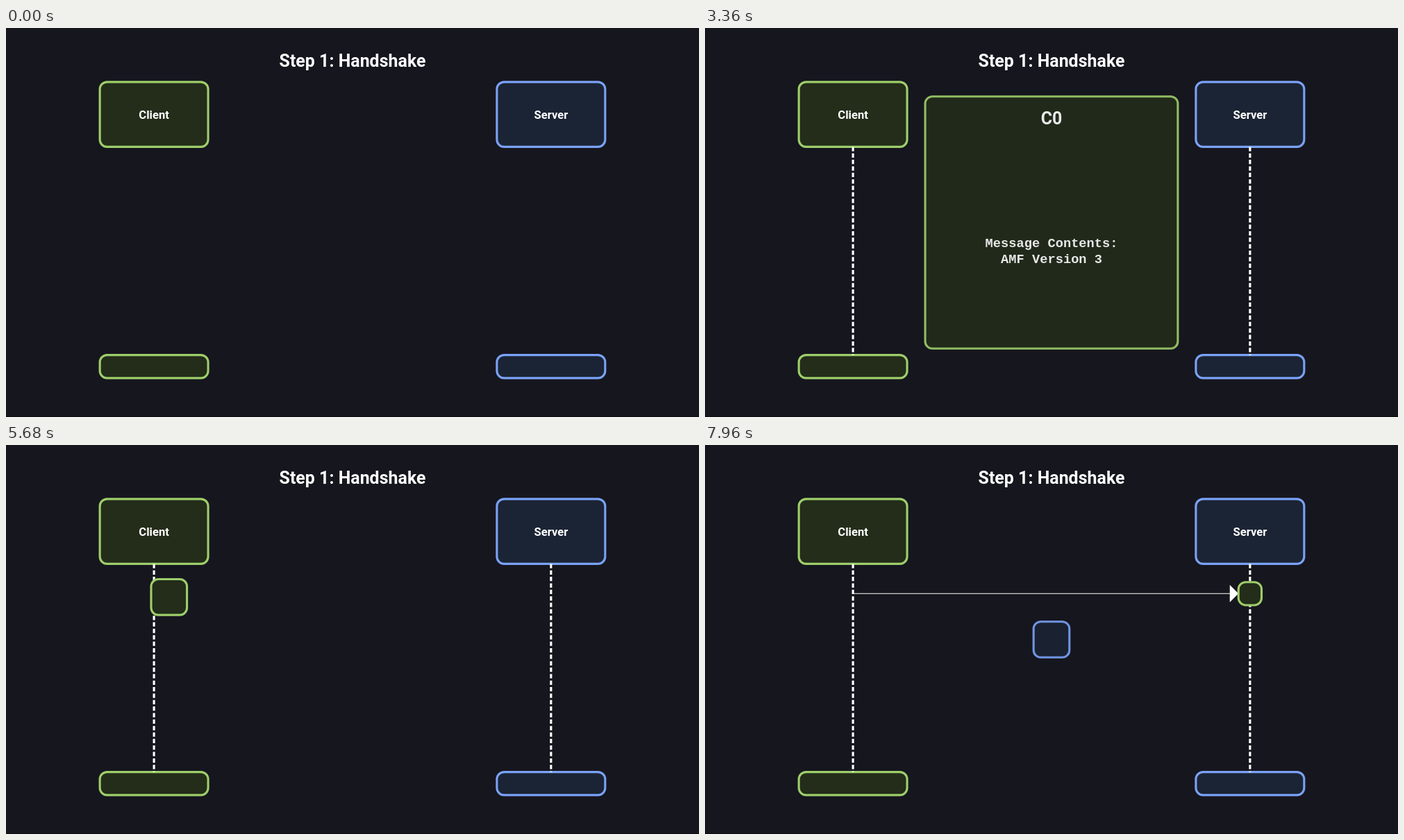
Animation, 998 px wide and 561 px high, one loop 8000 ms. Source, as an HTML page with a canvas:

```html
<!DOCTYPE html>
<html lang="en">
<head>
<meta charset="utf-8">
<title>Step 1: Handshake</title>
<style>
  html, body { margin: 0; width: 100%; height: 100%; overflow: hidden; background: #16161e; }
  canvas { display: block; width: 998px; height: 561px; }
</style>
</head>
<body>
<canvas id="stage" width="998" height="561"></canvas>
<script>
const W = 998, H = 561, LOOP = 8000, STEP = 40;
const BG = '#16161e';
const GREEN = { stroke: '#9ece6a', fill: '#232d1a' };
const BLUE = { stroke: '#7aa2f7', fill: '#1b2434' };
const SANS = 'Roboto, sans-serif';
const MONO = '"Courier New", Courier, "Liberation Mono", monospace';

// Scene units are 1920 x 1080.
const CLIENT_X = 410, SERVER_X = 1510, MID_X = 960, MID_Y = 540, ROW_Y = 412.6;
const BOX = 64, SMALL = 50, LARGE = 700;
const MESSAGE = 'Message Contents:\nAMF Version 3';
const PAYLOAD = 'Payload:\n0x03';

function makeLayer(canvas) {
  canvas.width = W;
  canvas.height = H;
  const c = canvas.getContext('2d');
  c.setTransform(W / 1920, 0, 0, H / 1080, 0, 0);
  return c;
}
const ctx = makeLayer(document.getElementById('stage'));
const layer = makeLayer(document.createElement('canvas'));

const lerp = (a, b, v) => a + (b - a) * v;
const ease = u => u < 0.5 ? 4 * u ** 3 : 1 - (2 - 2 * u) ** 3 / 2;
const tween = (t, start, length = 600) =>
  ease(Math.min(1, Math.max(0, (t - start) / length)));

function card(c, x, y, w, h, color) {
  c.beginPath();
  c.roundRect(x - w / 2, y - h / 2, w, h, 20);
  c.fillStyle = color.fill;
  c.fill();
  c.lineWidth = 6;
  c.strokeStyle = color.stroke;
  c.stroke();
}

function label(c, text, x, baseline, size, family = SANS) {
  c.font = `bold ${size}px ${family}`;
  c.textAlign = 'center';
  c.textBaseline = 'alphabetic';
  c.fillStyle = '#fff';
  c.fillText(text, x, baseline);
}

function lifeline(x, v) {
  if (v <= 0) return;
  ctx.beginPath();
  ctx.moveTo(x, 330);
  ctx.lineTo(x, lerp(330, 908, v));
  ctx.setLineDash([12, 6]);
  ctx.lineWidth = 6;
  ctx.strokeStyle = '#fff';
  ctx.stroke();
  ctx.setLineDash([]);
}

function arrow(x1, x2, y) {
  ctx.strokeStyle = ctx.fillStyle = '#fff';
  ctx.lineWidth = 2;
  ctx.beginPath();
  ctx.moveTo(x1, y);
  ctx.lineTo(Math.max(x1, x2 - 20), y);
  ctx.stroke();
  const head = Math.min(24, x2 - x1);
  ctx.beginPath();
  ctx.moveTo(x2, y);
  ctx.lineTo(x2 - head, y - head);
  ctx.lineTo(x2 - head, y + head);
  ctx.fill();
}

// Rewrites a longer string into a shorter one from right to left.
function morph(from, to, v) {
  if (v <= 0) return from;
  if (v >= 1) return to;
  const kept = Math.round(from.length * (1 - v));
  const length = Math.floor(lerp(from.length + 1, to.length, v));
  return [...from].map((ch, i) => {
    if (i < kept) return ch;
    return to[i] ?? (i < length ? ch : '');
  }).join('');
}

function bodyText(c, x, y, v) {
  c.font = `bold 36px ${MONO}`;
  const lines = morph(MESSAGE, PAYLOAD, v).split('\n');
  const widest = Math.max(...lines.map(s => c.measureText(s).width));
  const room = c.measureText(MESSAGE.split('\n')[0]).width - 68 * v;
  const shift = Math.max(0, (widest - room) / 2);
  lines.forEach((s, i) => label(c, s, x + shift, y + 68.5 + i * 43.2, 36, MONO));
}

function packet(x, y, size, color, alpha, textAlpha = 0, v = 0) {
  if (alpha <= 0) return;
  layer.clearRect(0, 0, 1920, 1080);
  card(layer, x, y, size, size, color);
  if (textAlpha > 0) {
    layer.globalAlpha = textAlpha;
    label(layer, 'C0', x, y - size / 2 + 78, 48);
    bodyText(layer, x, y, v);
    layer.globalAlpha = 1;
  }
  ctx.globalAlpha = alpha;
  ctx.drawImage(layer.canvas, 0, 0, 1920, 1080);
  ctx.globalAlpha = 1;
}

const boxSize = v => Math.max(BOX, lerp(SMALL, LARGE, v));

function draw(t) {
  ctx.fillStyle = BG;
  ctx.fillRect(0, 0, 1920, 1080);

  label(ctx, 'Step 1: Handshake', MID_X, 107.8, 48);
  for (const [x, name, color] of [[CLIENT_X, 'Client', GREEN], [SERVER_X, 'Server', BLUE]]) {
    card(ctx, x, 240, 300, 180, color);
    label(ctx, name, x, 251.5, 32);
    card(ctx, x, 940, 300, 64, color);
    lifeline(x, tween(t, 0));
  }

  const dock = tween(t, 4800, 1200);
  const send = tween(t, 6000, 1200);
  const leave = tween(t, 4800);
  if (send > 0) arrow(CLIENT_X, lerp(CLIENT_X, SERVER_X - BOX / 2, send), ROW_Y);

  packet(
    lerp(lerp(MID_X, CLIENT_X, dock), SERVER_X, send),
    lerp(MID_Y, ROW_Y, dock),
    boxSize(tween(t, 1200) - dock),
    GREEN,
    0.9 * tween(t, 600) + 0.1 * leave,
    tween(t, 1800) * (1 - leave),
    tween(t, 3300)
  );
  packet(MID_X, MID_Y, boxSize(tween(t, 7800)), BLUE, 0.9 * tween(t, 7200));

  // Dark bottom edge
  ctx.fillStyle = '#0b0b0f';
  ctx.fillRect(0, 1080 * 560 / H, 1920, 2);
}

const begin = performance.now();
function frame() {
  const t = (performance.now() - begin) % LOOP;
  draw(Math.floor(t / STEP) * STEP);
  requestAnimationFrame(frame);
}
frame();
</script>
</body>
</html>
```
